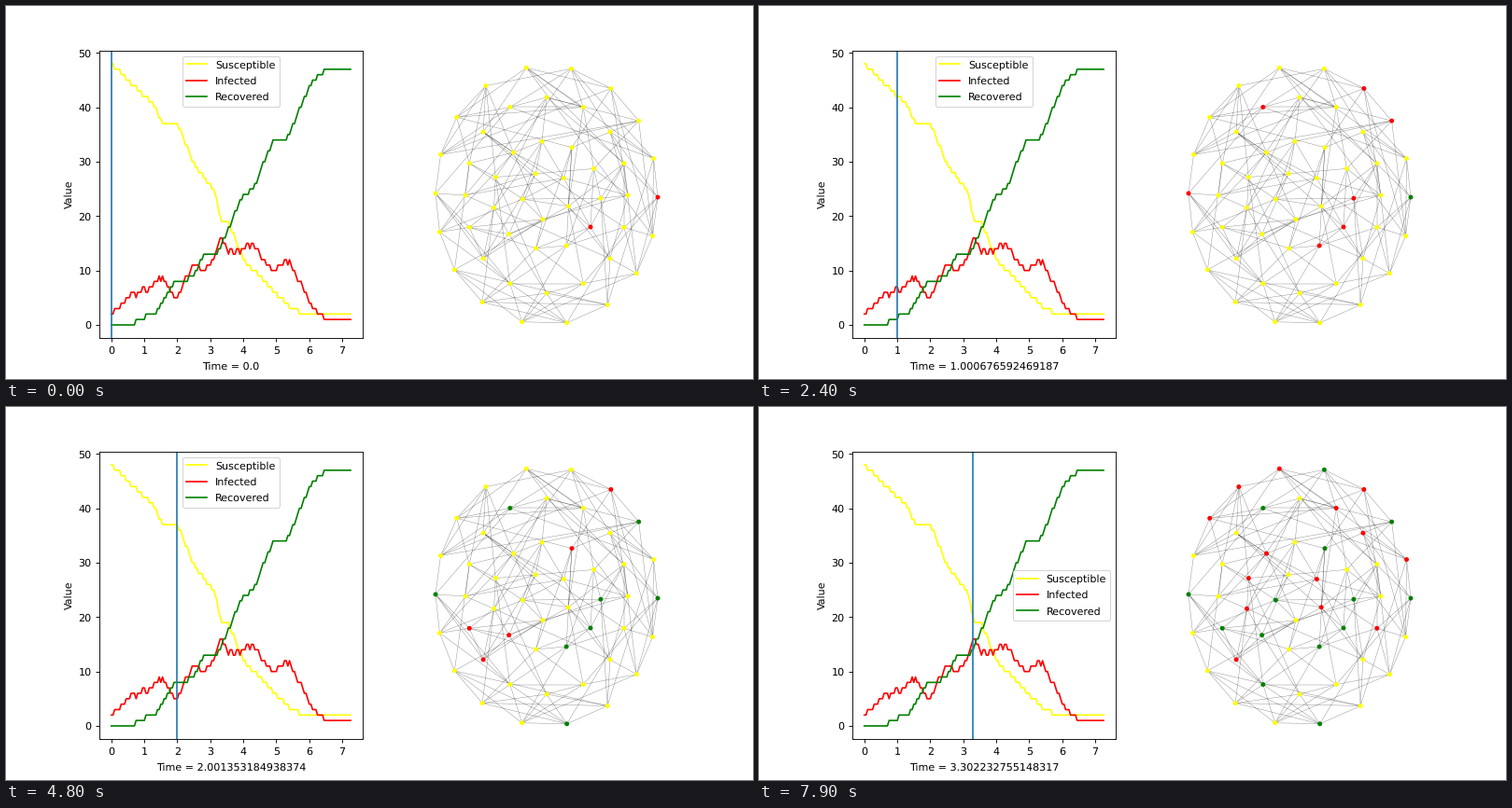
A matplotlib script that plays this animation: 800 px wide and 400 px high, repeating every 8 s.

```python
from itertools import combinations

import numpy as np
import matplotlib.pyplot as plt
from matplotlib.animation import FuncAnimation
from matplotlib.collections import LineCollection

plt.rcParams["text.hinting"] = "no_hinting"

FRAMES, INTERVAL = 80, 100
DT = 0.05003382962345935
TOTAL, N_TIMES = 50, 146
LEGEND_STEP = 43

# Key points (time step, people) of the two monotone curves
SUSCEPTIBLE = [(0, 48), (26, 40.4), (31, 37), (40, 37), (51, 29), (62, 25),
               (67, 19), (71, 19), (80, 12), (109, 3), (118, 2)]
RECOVERED = [(14, 0.4), (28, 2.6), (38, 7.5), (50, 9), (56, 13), (64, 13),
             (80, 24), (86, 25), (98, 34), (106, 34), (122, 45), (131, 47)]

# Order in which the nodes fall ill; every fifth one stays ill for long
SICK = np.array([5, 38, 37, 39, 2, 3, 14, 33, 9, 28, 35, 41, 29, 27, 16, 48,
                 1, 19, 45, 0, 17, 43, 46, 42, 44, 20, 4, 23])


def people(points, step):
    """Whole number of people on a curve through the key points."""
    return np.round(np.interp(step, *zip(*points))).astype(int)


def ring(n, start, radius, stretch):
    """Points evenly spread on a slightly tall ring, clockwise from the top."""
    a = np.radians(start + 360 * np.arange(n) / n)
    r = radius + stretch * np.cos(2 * a)
    return np.column_stack([579 + r * np.sin(a), 203 - r * np.cos(a)])


def make_edges(nodes, degree=7, spread=250):
    """Join near pairs first, with some luck, up to a fixed degree."""
    rng = np.random.default_rng(4)
    pairs = np.array(list(combinations(range(len(nodes)), 2)))
    length = np.hypot(*(nodes[pairs[:, 0]] - nodes[pairs[:, 1]]).T)
    free = np.full(len(nodes), degree)
    edges = []
    for pair in pairs[np.argsort(length + rng.uniform(0, spread, len(pairs)))]:
        if free[pair].all():
            free[pair] -= 1
            edges.append(nodes[pair])
    return edges


def node_colors(step):
    ill = SICK[:TOTAL - people(SUSCEPTIBLE, step)]
    quick = SICK[np.arange(len(SICK)) % 5 != 4]
    colors = np.full(TOTAL, "yellow")
    colors[ill] = "red"
    colors[quick[:people(RECOVERED, step)]] = "green"
    return colors


nodes = np.vstack([ring(18, -9, 129, 10), ring(16, 0, 96, 9),
                   ring(11, -5, 58, 0), ring(5, 45, 26, 0)])

fig = plt.figure(figsize=(10, 5), dpi=80)
ax = fig.add_subplot(1, 2, 1)
steps = np.arange(N_TIMES)
susceptible = people(SUSCEPTIBLE, steps)
recovered = people(RECOVERED, steps)
for values, color, name in [
        (susceptible, "yellow", "Susceptible"),
        (TOTAL - susceptible - recovered, "red", "Infected"),
        (recovered, "green", "Recovered")]:
    ax.plot(steps * DT, values, color=color, label=name)
ax.tick_params(pad=4)
ax.set_ylabel("Value")
label = ax.set_xlabel("Time = 0.0", labelpad=5.5)
legend = ax.legend(loc="upper center", labelspacing=0.6)
cursor = ax.axvline(0)

# Network drawn in pixel coordinates
net = fig.add_axes([0, 0, 1, 1])
net.set(xlim=(0, 800), ylim=(400, 0))
net.axis("off")
net.add_collection(LineCollection(make_edges(nodes), colors="black",
                                  linewidths=0.4, alpha=0.45))
dots = net.scatter(*nodes.T, s=20, linewidths=0, zorder=3)


def update(frame):
    step = (5 * frame + 2) // 6
    t = step * DT
    cursor.set_xdata([t, t])
    label.set_text(f"Time = {t}")
    # The legend makes way once the cursor reaches it
    legend.set_loc("upper center" if step < LEGEND_STEP else "center right")
    dots.set_facecolors(node_colors(step - 1))
    return cursor, label, legend, dots


anim = FuncAnimation(fig, update, frames=FRAMES, interval=INTERVAL,
                     repeat=True, repeat_delay=0, blit=False)
plt.show()
```
